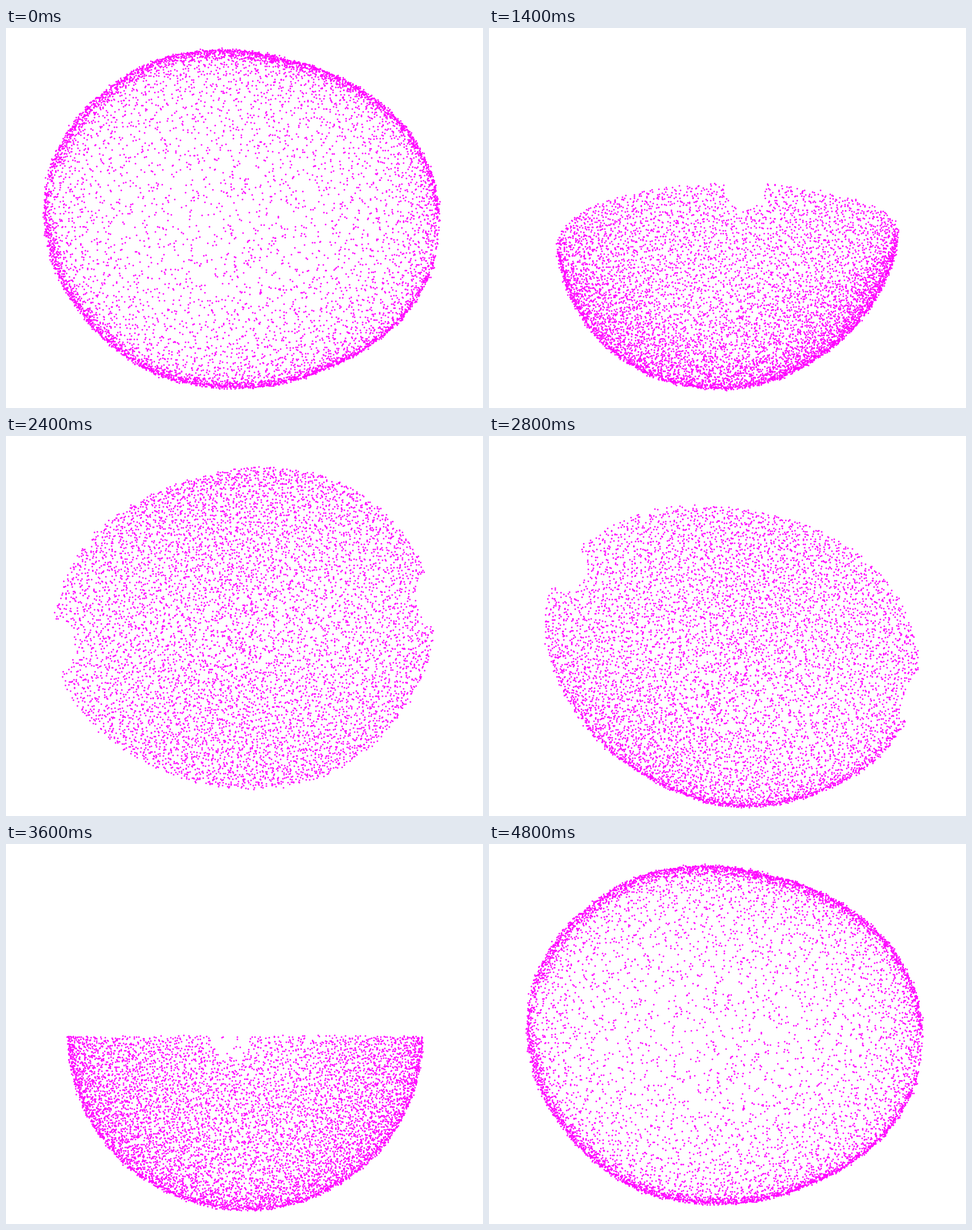
A matplotlib script for the animation above (5000 ms loop, 838 by 668 pixels).

```python
import numpy as np
import matplotlib.pyplot as plt
from matplotlib.animation import FuncAnimation

WIDTH, HEIGHT, DPI = 838, 668, 100
FRAMES, INTERVAL = 25, 200
CAMERA_DISTANCE = 940
DEPTH = 285          # bowl depth in pixels
RIM_DROP = 3         # rim plane sits slightly below the pivot
POINTS = 8200

# Rim radius every 15 degrees, seen from above
RIM = [334, 334, 325, 312, 302, 288, 278, 273, 280, 294, 312, 324,
       326, 326, 321, 306, 293, 288, 286, 290, 299, 306, 315, 327]


def rim_radius(angle):
    return np.interp(np.degrees(angle), np.arange(0, 360, 15), RIM, period=360)


def surface(angle, drop):
    """Point on the bowl; drop runs from 0 at the rim to 1 at the bottom."""
    width = np.sqrt(1 - drop ** 2)
    offset = (np.degrees(angle) - 186 + 180) % 360 - 180
    flare = 11 * np.exp(-(offset / 20) ** 2 - (drop / 0.3) ** 2)
    radius = (rim_radius(angle) + flare) * width
    # One flank is flatter between the rim and the bottom
    flank = np.maximum(np.cos(angle - np.radians(208)), 0)
    flatten = 1 - 0.055 * flank * 2 * width * drop
    return flatten * np.array([radius * np.cos(angle), radius * np.sin(angle),
                               -DEPTH * drop])


def make_bowl():
    rng = np.random.default_rng(12)
    index = np.arange(POINTS)
    spacing = np.sqrt(2 * np.pi / POINTS)
    drop = (index + 0.5) / POINTS + rng.normal(0, 0.5 * spacing, POINTS)
    drop = np.abs(drop)
    drop = np.where(drop > 1, 2 - drop, drop)
    golden = np.pi * (3 - np.sqrt(5))
    spread = spacing / np.sqrt(np.maximum(1 - drop ** 2, 0.001))
    angle = index * golden + rng.normal(0, 0.5, POINTS) * spread
    bowl = surface(angle, drop) * rng.normal(1, 0.005, POINTS)
    bowl[2] = np.minimum(bowl[2], 0)

    keep = np.ones(POINTS, bool)
    for degrees, radius in ((8, 48), (186, 44)):
        notch = surface(np.radians(degrees), 0.05)
        keep &= np.linalg.norm(bowl - notch[:, None], axis=0) > radius
    bowl = bowl[:, keep]
    bowl[2] -= RIM_DROP
    return bowl


def project(points, turn):
    """Orbit around the bowl while tilting from below, over the rim and back."""
    spin, tilt = np.pi - turn, abs(np.pi - turn)
    px, py, pz = points
    x = px * np.cos(spin) - py * np.sin(spin)
    y = px * np.sin(spin) + py * np.cos(spin)
    up = y * np.cos(tilt) + pz * np.sin(tilt)
    near = pz * np.cos(tilt) - y * np.sin(tilt)
    scale = CAMERA_DISTANCE / (CAMERA_DISTANCE - near)
    return WIDTH / 2 + x * scale, HEIGHT / 2 - up * scale


bowl = make_bowl()
fig = plt.figure(figsize=(WIDTH / DPI, HEIGHT / DPI), dpi=DPI, facecolor="white")
ax = fig.add_axes([0, 0, 1, 1])
ax.set_xlim(0, WIDTH)
ax.set_ylim(HEIGHT, 0)
ax.axis("off")
dots, = ax.plot([], [], "o", color="#ff00ff", markersize=2.8 * 72 / DPI,
                markeredgewidth=0)


def update(frame):
    dots.set_data(*project(bowl, 2 * np.pi * frame / (FRAMES - 1)))
    return dots,


animation = FuncAnimation(fig, update, frames=FRAMES, interval=INTERVAL,
                          repeat=True, repeat_delay=0, blit=False)
plt.show()
```
